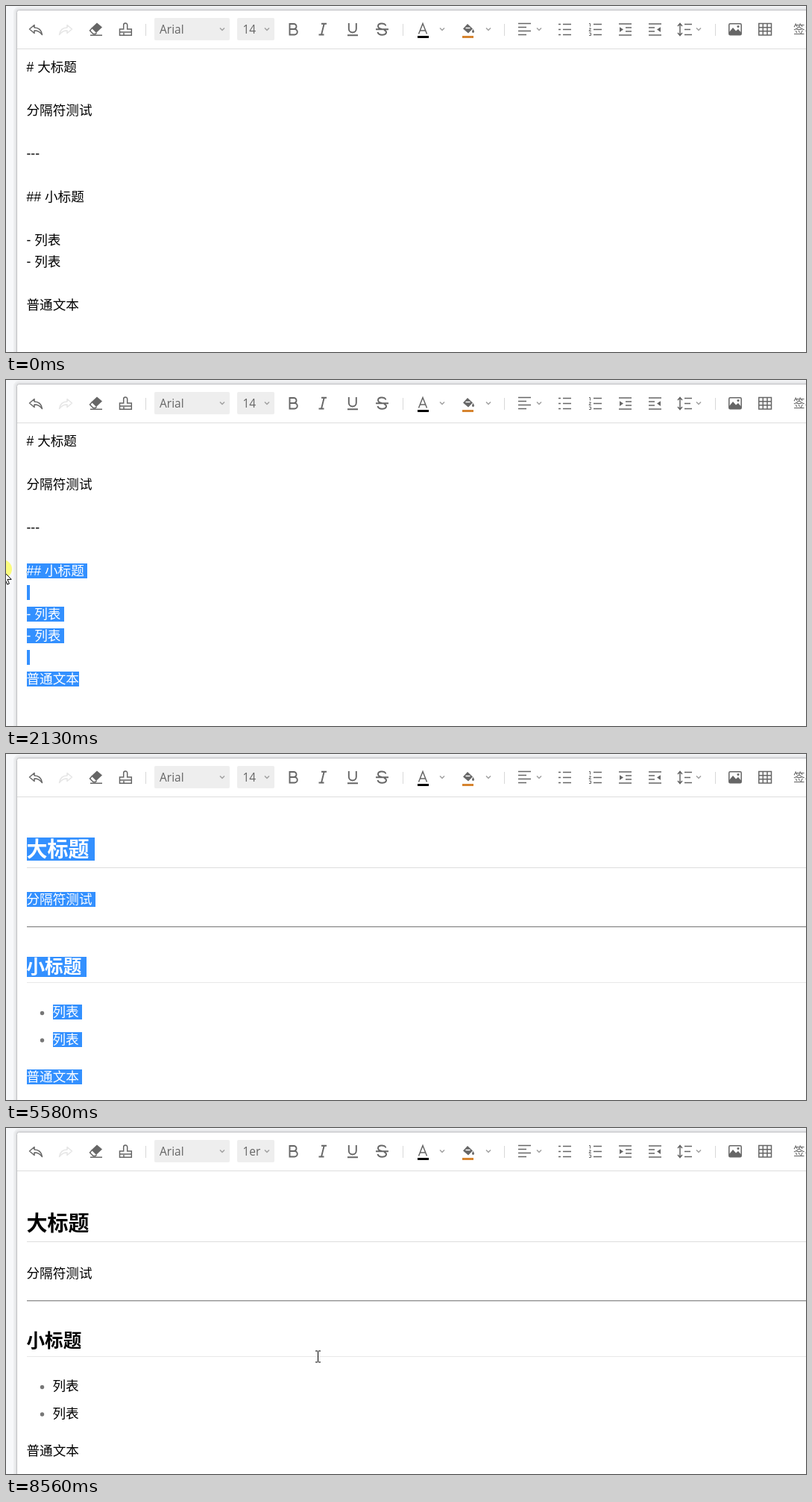
Recreate the animation shown at these times as an HTML page. Size 1073 by 464 pixels, loop 8970 ms.

```html
<!DOCTYPE html>
<html lang="zh">
<head>
<meta charset="utf-8">
<style>
html, body { margin: 0; width: 100%; height: 100%; overflow: hidden; background: #f7f8fa; }
svg { display: block; }
text { white-space: pre; }
.doc { font-family: "Liberation Sans", "Noto Sans CJK SC", "Noto Sans CJK", sans-serif; }
.ui { font: 15.5px "Open Sans", "Noto Sans CJK SC", "Noto Sans CJK", sans-serif; fill: #666; }
#icons { fill: none; stroke: #666; stroke-width: 1.5; }
#icons text { stroke: none; }
.solid { fill: #666; stroke: none; }
.thick { stroke-width: 1.9; }
.field { fill: #eee; stroke: none; }
.chev { stroke: #a0a0a0; }
.sep { stroke: #d8d8d8; stroke-width: 1; }
</style>
</head>
<body>
<svg width="1073" height="464" viewBox="0 0 1073 464">
  <defs>
    <clipPath id="clip"></clipPath>
    <path id="frame" d="M14.5 470V8.500a3 3 0 0 1 3-3H1080V470z"/>
    <path id="undo" d="M38 25.500L31.500 31L38 36.500V33C43 33 46 35 48.500 38.500C47.500 32.500 44 29 38 29Z" stroke-linejoin="round"/>
  </defs>
  <g fill="none" stroke="#000" stroke-opacity=".04">
    <use href="#frame" stroke-width="9"/><use href="#frame" stroke-width="5"/>
  </g>
  <use href="#frame" fill="#fff" stroke="#bfc0c3"/>
  <path d="M15 57.500H1073" stroke="#dedede"/>

  <g id="icons">
    <use href="#undo"/>
    <use href="#undo" transform="matrix(-1 0 0 1 120 0)" opacity=".17"/>
    <!-- eraser, brush -->
    <path class="solid" d="M122 22.500L129 28.500L121 36L114.500 29.500z"/>
    <path d="M115.500 29.500L112.500 33L117 37.500H120L121.500 36M113 39.300H129"/>
    <path d="M157.700 31V25.500a2.500 2.500 0 0 1 5 0V31h5.600v8.300H152.500V31zM152.500 35h16M158 36v3"/>
    <!-- font and size -->
    <rect class="field" x="199" y="16" width="101" height="30" rx="2"/>
    <rect class="field" x="310" y="16" width="50" height="30" rx="2"/>
    <text class="ui" x="206" y="37">Arial</text>
    <text class="ui" x="317.500" y="37" id="size">14</text>
    <!-- bold, italic, underline, strike -->
    <g class="thick">
      <path d="M380.500 24h5.500a3.500 3.500 0 0 1 0 7h-5.500zM380.500 31h6.500a3.700 3.700 0 0 1 0 7.500h-6.500z"/>
      <path d="M423 23.800h7M419.500 38.500h7M426.700 23.800L423 38.500"/>
      <path d="M459.800 23v7.500a5 5 0 0 0 10 0V23M458 39.300h14"/>
      <path d="M509.500 26.500C508 22.500 499 22.500 499 27C499 29.500 501.500 30.500 504 31M507 32C512 34 510.500 38.700 504.500 38.700C501 38.700 499 37 498.500 35M496 31.200h17"/>
    </g>
    <!-- text and fill colour -->
    <path d="M553.500 37.500L559 23.500L564.500 37.500M555.500 33h7"/>
    <path d="M552 41.500h15" stroke="#000" stroke-width="3"/>
    <path class="solid" d="M619 24L626 30.500L620 36.500L613 30.500zM626.500 31q3 4.500 0 5q-3-.5 0-5z"/>
    <path d="M616.500 29.500h6" stroke="#fff"/>
    <path d="M612 41.500h15" stroke="#d6842f" stroke-width="3"/>
    <!-- list numbers, indent arrows, line height -->
    <path d="M782 23.500h1.500v4M782 30h2.500l-2.500 3.500h3M782 36h2.500v3.500h-2.500" stroke-width="1"/>
    <path class="solid" d="M823 28.200v6.800l5-3.400zM878 28.200v6.800l-5-3.400z"/>
    <path d="M904 24v15M901 27l3-3.500l3 3.500M901 36l3 3.500l3-3.500"/>
    <!-- picture, table -->
    <rect x="969.800" y="23.800" width="16.400" height="15" rx="1.500"/>
    <path class="solid" d="M970 38.500V35L975 29L979 33.500L982 31L986 35.500V38.500z"/>
    <circle class="solid" cx="982" cy="27.500" r="1.500"/>
    <path d="M1009.800 23.500h16.700v15.500h-16.700zM1015.300 23.500v15.500M1021 23.500v15.500M1009.800 28.700h16.700M1009.800 33.800h16.700"/>
    <text class="ui" x="1056" y="37">签名</text>
  </g>

  <g class="doc" id="page"></g>
  <g id="sel" fill="#3390ff"></g>
  <g class="doc" id="white" fill="#fff" clip-path="url(#clip)"></g>
  <rect id="caret" width="1" height="20"/>
  <g id="mouse">
    <circle id="press" cy="-2" r="12.500" fill="#ffff00" opacity=".5"/>
    <path id="arrow" d="M0 0v16.500l3.800-3.600l2.500 5.800l2.600-1.100l-2.500-5.700h5.300z" fill="#fff" stroke="#000"/>
    <path id="beam" d="M-3.500-7.500h3M.5-7.500h3M-3.500 7.500h3M.5 7.500h3M0-7v14" fill="none" stroke="#000"/>
  </g>
</svg>
<script>
const $ = id => document.getElementById(id);
const LOOP = 8970, DRAG = 1560, RELEASE = 3040, RENDER = 5580, DESELECT = 7540;
const SIZE = 17.6, ROW = 29;

// Toolbar parts that repeat
const path = (d, cls = '') => `<path class="${cls}" d="${d}"/>`;
const bars = (x, y, gap, ...widths) => path(widths.map((w, i) => `M${x} ${y + i * gap}h${w}`).join(''));
const indent = (x, inner) => bars(x, 24, 15, 17, 17) + bars(inner, 29, 5, 8, 8);
$('icons').innerHTML +=
  [187, 532, 668, 951].map(x => path(`M${x + .5} 24v16`, 'sep')).join('') +
  [290, 350, 585, 647, 715, 929].map(x => path(`M${x - 3} 29.500l3 3l3-3`, 'chev')).join('') +
  bars(687, 23.5, 5, 17, 11, 17, 11) + bars(741, 24.5, 7, 3, 3, 3) + bars(747, 24.5, 7, 11, 11, 11) +
  bars(788, 24.5, 7, 11, 11, 11) + bars(910, 24.5, 7, 10, 8, 10) + indent(822, 831) + indent(862, 862);

// A line of text is placed by its vertical centre
const line = (s, y, x = 27.5, size = SIZE, weight = 400) => ({ s, x, y, size, weight });
const plain = '# 大标题||分隔符测试||---||## 小标题||- 列表|- 列表||普通文本'
  .split('|').map((s, i) => line(s, 82 + i * ROW));
const rich = [
  line('大标题', 128, 27.5, 28, 700), line('分隔符测试', 195), line('小标题', 285.5, 27.5, 24.6, 700),
  line('列表', 346, 62.5), line('列表', 383, 62.5), line('普通文本', 433)
];
const rule = (y, color) => `<path d="M28 ${y}.5H1073" stroke="${color}"/>`;
const dot = y => `<circle cx="48.500" cy="${y}" r="2.700" fill="#777"/>`;
const rules = rule(152, '#ddd') + rule(231, '#8c8c8c') + rule(232, '#ddd') + rule(306, '#e8e8e8') + dot(347.5) + dot(384);

const markup = lines => lines.map(l =>
  `<text x="${l.x}" y="${l.y + .36 * l.size}" font-size="${l.size}" font-weight="${l.weight}">${l.s}</text>`).join('');

function setPage(lines, extra) {
  $('page').innerHTML = extra + markup(lines);
  $('white').innerHTML = markup(lines);
  $('page').querySelectorAll('text').forEach((el, i) => lines[i].width = el.getComputedTextLength());
}

// Pointer moves: start, end, goal; it rests between moves
const visits = [
  { from: 220, to: 3480, x: 912, y: 455, moves: [
    [220, 500, 280, 316], [670, 1080, 270, 346], [1080, DRAG, 137, 416], [DRAG, 1640, 142, 427],
    [1640, 2130, -5, 256], [2130, 2440, -5, 131], [2480, 2690, -5, 90], [RELEASE, 3480, 1080, -6]] },
  { from: 6170, to: LOOP, x: 995, y: 2, moves: [
    [6170, 6570, 649, 203], [6570, 6780, 610, 227], [7260, DESELECT, 412, 340], [8360, 8560, 418, 306]] }
];

function pointer(t) {
  const visit = visits.find(v => t >= v.from && t < v.to);
  if (!visit) return null;
  let { x, y } = visit;
  for (const [start, end, gx, gy] of visit.moves) {
    const k = Math.max(0, Math.min(1, (t - start) / (end - start)));
    x += (gx - x) * k;
    y += (gy - y) * k;
  }
  return { x: Math.floor(x) + .5, y: Math.floor(y) + .5 };
}

// The drag runs upwards from the end of the last plain line
function selection(t) {
  if (t < DRAG || t >= DESELECT) return '';
  const dragging = t < RENDER, lines = dragging ? plain : rich;
  const last = lines.length - 1;
  const p = pointer(Math.min(t, RELEASE));
  const first = dragging ? Math.max(0, Math.min(last, Math.floor((p.y - 67.5) / ROW))) : 0;
  return lines.map((l, i) => {
    if (i < first) return '';
    const left = Math.round(l.x), h = Math.round(l.size * 1.11);
    const tail = dragging && i === last ? 0 : l.size * .26;
    const right = Math.round(l.x + l.width + tail);
    const start = dragging && i === first ? Math.max(left, Math.min(p.x, right)) : left;
    return `<rect x="${start}" y="${Math.floor(l.y - h / 2)}" width="${right - start}" height="${h}"/>`;
  }).join('');
}

const within = (t, a, b) => t >= a && t < b;
const show = (el, on) => el.setAttribute('visibility', on ? 'visible' : 'hidden');
let shown;

function draw(now) {
  const t = now % LOOP, after = t >= RENDER;
  if (shown !== after) {
    shown = after;
    after ? setPage(rich, rules) : setPage(plain, '');
  }
  $('clip').innerHTML = $('sel').innerHTML = selection(t);
  $('size').textContent = t >= DESELECT ? '1er' : '14';

  show($('caret'), within(t, 860, DRAG) || within(t, 7600, 8400));
  $('caret').setAttribute('x', after ? 98 : 73);
  $('caret').setAttribute('y', after ? 336 : 333);

  const p = pointer(t);
  const arrow = p && (p.x < 15 || p.y < 57);
  show($('arrow'), p && arrow);
  show($('beam'), p && !arrow);
  show($('press'), p && (within(t, 780, 900) || within(t, DRAG, RELEASE) || within(t, DESELECT, 7630)));
  if (p) $('mouse').setAttribute('transform', `translate(${p.x} ${p.y})`);
  requestAnimationFrame(draw);
}
requestAnimationFrame(draw);
</script>
</body>
</html>
```
